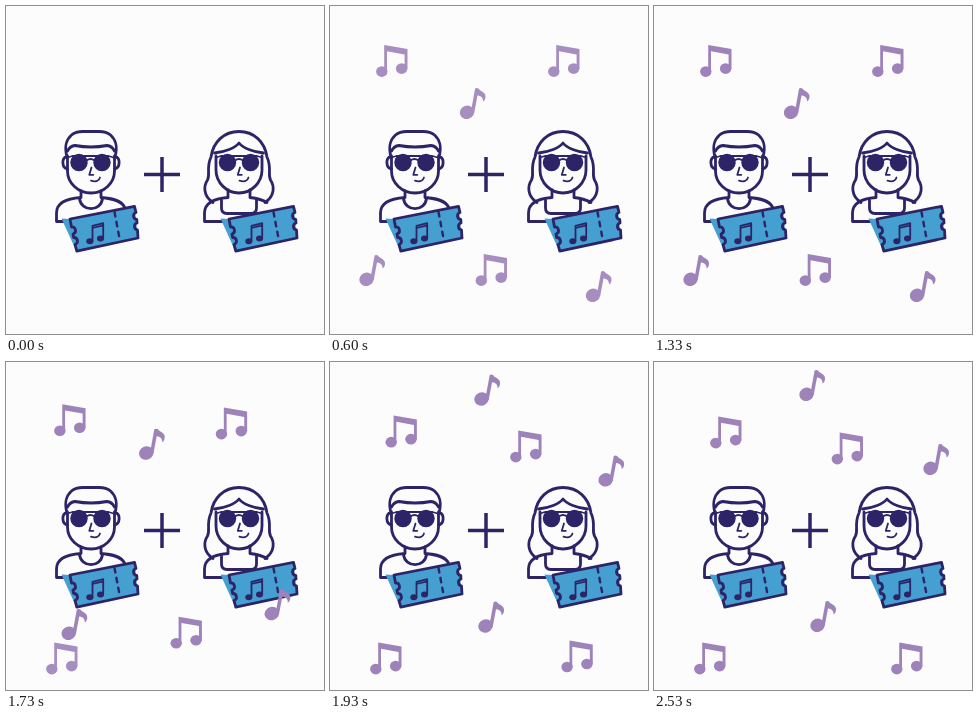
Recreate the animation shown at these times as an HTML page. Size 318 px wide and 328 px high, loop 2990 ms.

```html
<!DOCTYPE html>
<html lang="en">
<head>
<meta charset="utf-8">
<title>Two tickets</title>
<style>
html, body { margin: 0; width: 100%; height: 100%; overflow: hidden; background: #fcfcfc; }
svg { display: block; width: 318px; height: 328px; }
.line { fill: none; stroke: #2d2467; stroke-width: 2.8; stroke-linecap: round; stroke-linejoin: round; }
.solid { fill: #2d2467; }
.thin { stroke-width: 1.8; }
.blue { fill: #459fd1; }
.note { fill: #9d83ba; }
</style>
</head>
<body>
<svg viewBox="0 0 318 328">
  <defs>
    <g id="double">
      <ellipse cx="-10.2" cy="10.6" rx="5.7" ry="5.3"/>
      <ellipse cx="9.6" cy="7.6" rx="5.7" ry="5.3"/>
      <path d="M-7.8-16L15.5-12V8H12.6V-6.6L-5-9.8V11H-7.8Z"/>
    </g>
    <g id="single">
      <ellipse cx="-5.5" cy="8.3" rx="7.3" ry="6.6" transform="rotate(-20 -5.5 8.3)"/>
      <path d="M2.6-15.5Q4-16.5 6-15.6C8-12 13.5-12.5 13-7C12.8-5 12-3.5 10.5-2.5C11-6.5 7.5-8.5 5-8.5L1.6 9.5L-1.5 7Z"/>
    </g>
    <g id="ticket">
      <path class="blue" d="M55.5 212.5L64 213L128.5 200L132 232L70.5 245.5Z"/>
      <path class="line" d="M64 213L128.5 200.3L130 206.5A3.6 3.6 0 0 0 130.8 213.5L131 217A3.600 3.600 0 0 0 131.500 224L132 232L70.800 245.200L69 238.500A3.600 3.600 0 0 0 67.600 231.500L67 228A3.600 3.600 0 0 0 65.500 221Z"/>
      <path class="line" style="stroke-width:2.4" stroke-dasharray="4.5 5.5" d="M108.500 206L114 235"/>
      <ellipse class="solid" cx="83.800" cy="235.200" rx="3.500" ry="3"/>
      <ellipse class="solid" cx="94.500" cy="232.600" rx="3.500" ry="3"/>
      <path class="line thin" d="M86.500 235V219.800L97.200 217.200V232.500M86.500 222L97.200 219.400"/>
    </g>
    <g id="shades">
      <circle class="solid" cx="-11.5" cy="0" r="8.7"/>
      <circle class="solid" cx="11.5" cy="0" r="8.7"/>
      <path class="line thin" d="M-23-5L-18-6.500H18L23-5M-4-2Q0-5 4-2"/>
      <path class="line thin" d="M1 5L-1.2 12.3H2.8M.5 18.200Q7.500 20.500 9.500 15"/>
    </g>
  </defs>

  <g class="line">
    <path d="M61.500 150V165C61.500 177 72 187 85 187S108.500 177 108.500 165V150"/>
    <path d="M61 151C58 140 60 134 65.500 129Q69.500 125.500 77 125.500H93Q100.500 125.500 104.500 129C110 134 112 140 109 151"/>
    <path d="M61.500 145Q64 140 69 139.500Q85 142.500 101 139.500Q106 140 108.500 145"/>
    <path d="M60.500 151C55.500 151 55.500 162 61.500 163M109.500 151C114.500 151 114.500 162 108.500 163"/>
    <path d="M75 185V191.500C60 192.500 50.500 197 50.500 207V215.500H64"/>
    <path d="M95 185V191.500C107 192.500 115 194.500 118.500 201"/>
    <path d="M73.500 192.500C75 206 95 206 96.500 192.500"/>
  </g>
  <use href="#shades" x="84.500" y="156.500"/>
  <use href="#ticket"/>

  <path class="line" style="stroke-width:3.5;stroke-linecap:butt" d="M138 168.500H174M156 151V186"/>

  <g class="line">
    <path d="M207 196.500C197 190 197.500 180 201.500 174C204.500 168 200 162 205 151C207 136 218 125.500 233 125.500S259 136 261 151C266 162 261.500 168 264.500 174C268.500 180 269 190 259 196.500"/>
    <path d="M208.500 147C219 146 229 142 233 137C237 142 247 146 257.500 147"/>
    <path d="M210 150V164C210 177 221 187 233 187S256 177 256 164V150"/>
    <path d="M222 184V191.500C209 192.500 198.500 197 198.500 207V215.500H222"/>
    <path d="M244 184V191.500C252 192.500 257 194 261 196.500"/>
    <path d="M215.500 194V202Q215.500 207.500 221 207.500H245Q250.500 207.500 250.500 202V194"/>
  </g>
  <use href="#shades" x="233" y="156.500"/>
  <use href="#ticket" x="159"/>
  <g id="notes" class="note"></g>
</svg>
<script>
const LOOP = 2990, FPS = 15;
const FADE = 540, MOVE = 530, START = 400, SHIFT = 1536;
// shape, from x, y, to x, y, start of the fade
const notes = [
  ["double", 62, 55, 72, 70.5, START],
  ["double", 234, 55, 193.5, 86.5, START],
  ["single", 142.5, 98, 158, 24, START],
  ["single", 42, 265, 169, 255, START],
  ["double", 161.5, 264, 253, 296.5, START],
  ["single", 268.5, 281, 282, 98, START],
  ["double", 56, 296.5, 56, 296.5, SHIFT]
];
const box = document.getElementById("notes");
const nodes = notes.map(([shape]) => {
  const el = document.createElementNS("http://www.w3.org/2000/svg", "use");
  el.setAttribute("href", "#" + shape);
  return box.appendChild(el);
});

const clamp = x => Math.min(1, Math.max(0, x));
const easeOut = x => 1 - (1 - x) ** 5;
const easeInOut = x => x < 0.5 ? 4 * x ** 3 : 1 - 4 * (1 - x) ** 3;

function draw(ms) {
  const t = Math.floor((ms % LOOP + 4) * FPS / 1000) * 1000 / FPS;
  const p = easeInOut(clamp((t - SHIFT) / MOVE));
  notes.forEach(([, x0, y0, x1, y1, begin], i) => {
    const x = x0 + (x1 - x0) * p, y = y0 + (y1 - y0) * p;
    const alpha = easeOut(clamp((t - begin) / FADE));
    nodes[i].setAttribute("transform", `translate(${x.toFixed(2)} ${y.toFixed(2)})`);
    nodes[i].setAttribute("opacity", alpha.toFixed(3));
  });
}

const origin = performance.now();
function tick() {
  draw(performance.now() - origin);
  requestAnimationFrame(tick);
}
draw(0);
requestAnimationFrame(tick);
</script>
</body>
</html>
```
